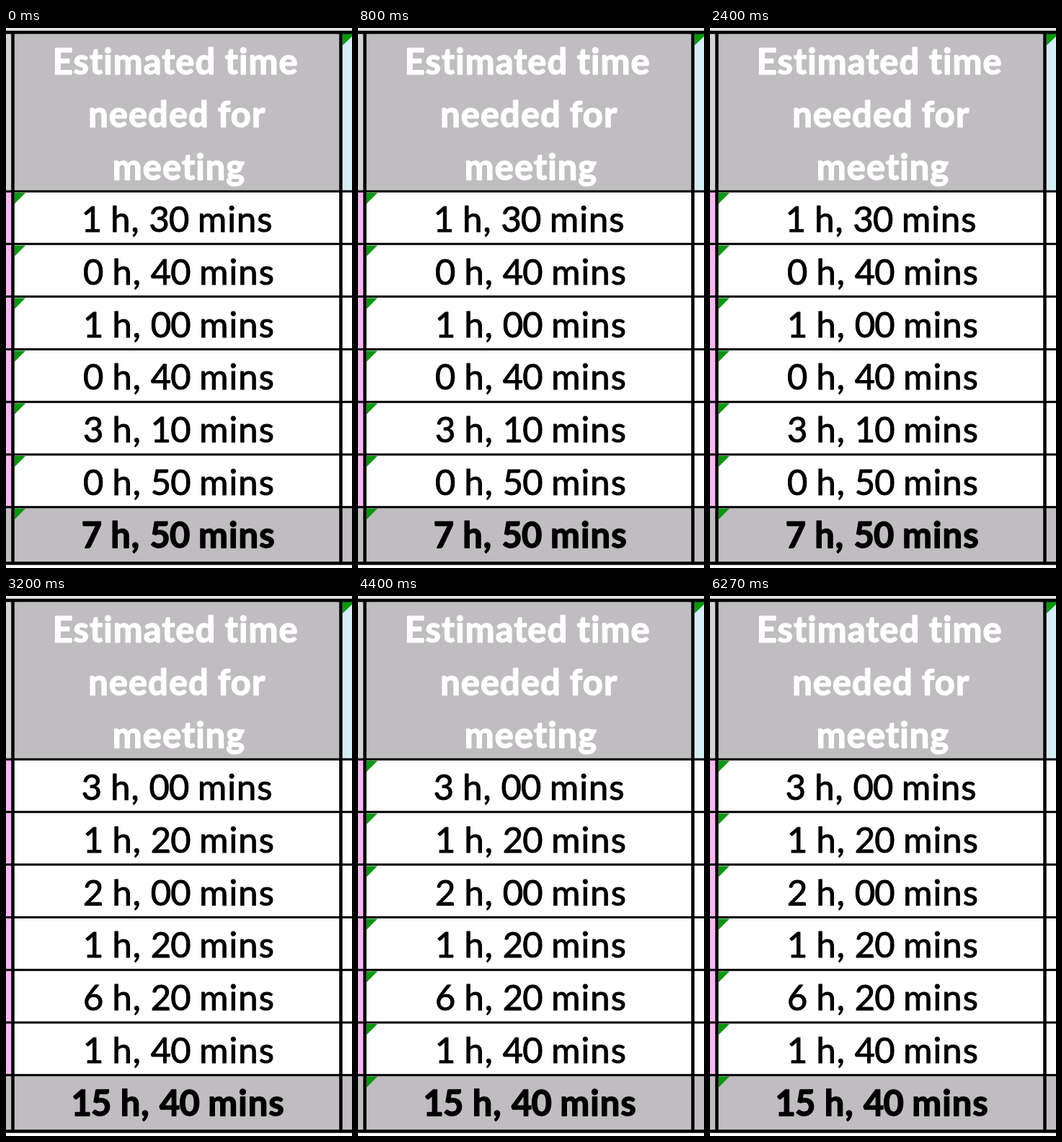
Animation, 480 px wide and 747 px high, one loop 6390 ms. Source, as an HTML page:

```html
<!DOCTYPE html>
<html lang="en">
<head>
<meta charset="utf-8">
<title>Estimated time needed for meeting</title>
<style>
  html, body { margin: 0; width: 100%; height: 100%; overflow: hidden; background: #fff; }
  svg { display: block; width: 100%; height: 100%; }
  text {
    font: 48.8px Lato, Carlito, sans-serif; text-anchor: middle; letter-spacing: 1.1px;
    fill: #000; stroke: #000; stroke-width: 1px; stroke-linejoin: round;
  }
  .digits { letter-spacing: -.8px; }
  .bold { font-weight: 700; stroke-width: 1.5px; }
  .head { fill: #fff; stroke: #fff; }
  .soft { filter: blur(.6px); }
  .before, .after, .flags { animation: 6390ms step-end infinite; }
  .before { animation-name: before; }
  .after { animation-name: after; }
  .flags { animation-name: flags; }
  /* values switch at 2600 ms; the cell flags come back at 3870 ms */
  @keyframes before { 0% { opacity: 1 } 40.689%, 100% { opacity: 0 } }
  @keyframes after { 0% { opacity: 0 } 40.689%, 100% { opacity: 1 } }
  @keyframes flags { 0% { opacity: 1 } 40.689% { opacity: 0 } 60.563%, 100% { opacity: 1 } }
</style>
</head>
<body>
<svg viewBox="0 0 480 747" preserveAspectRatio="none">
  <rect width="480" height="747" fill="#fff"/>
  <rect width="480" height="5" fill="#e4e4e4"/>
  <rect y="6" width="8" height="220" fill="#d2d2d2"/>
  <rect x="10" y="6" width="454" height="220" fill="#bfbdbf"/>
  <rect x="466" y="6" width="14" height="220" fill="#d5edf7"/>
  <rect y="226" width="8" height="437" fill="#fbb6f3"/>
  <rect y="663" width="480" height="77" fill="#bfbdbf"/>
  <g class="soft">
    <path d="M467 8H484L467 24Z" fill="#0a960f"/>
    <g class="flags" id="flags" fill="#0a960f"></g>
    <g id="lines" stroke="#000" fill="none">
      <path d="M-6 6H486M-6 740.5H486" stroke-width="4.5"/>
      <path d="M9.5 5V742M464.5 5V742" stroke-width="4.5"/>
    </g>
    <g id="title"></g>
    <g class="before" id="before"></g>
    <g class="after" id="after"></g>
  </g>
</svg>
<script>
  const PITCH = 72.8;
  const FIRST_LINE = 226;
  const FIRST_BASELINE = 282;
  const NS = 'http://www.w3.org/2000/svg';

  function add(parent, tag, attrs, content = '') {
    const node = document.createElementNS(NS, tag);
    for (const key in attrs) node.setAttribute(key, attrs[key]);
    node.textContent = content;
    document.getElementById(parent).append(node);
  }

  function word(parent, content, x, y, style = '') {
    const cls = /\d/.test(content) ? style + ' digits' : style;
    add(parent, 'text', { x, y, class: cls }, content);
  }

  function duration(parent, hours, minutes, centers, y, style) {
    [hours, 'h,', minutes, 'mins'].forEach((part, i) => word(parent, part, centers[i], y, style));
  }

  function column(parent, values, totalCenters) {
    values.forEach(([hours, minutes], row) => {
      const isTotal = row === values.length - 1;
      const shift = row ? 2.3 : 0;
      const centers = isTotal ? totalCenters : [118.5, 165.5, 226, 318.3].map(x => x + shift);
      duration(parent, hours, minutes, centers, FIRST_BASELINE + row * PITCH, isTotal ? 'bold' : '');
    });
  }

  for (let row = 0; row < 7; row++) {
    const y = FIRST_LINE + row * PITCH;
    add('lines', 'path', { d: `M-6 ${y}H486`, 'stroke-width': 3 });
    add('flags', 'path', { d: `M12 ${y + 2}h15l-15 15z` });
  }

  [['Estimated', 178, 63.5], ['time', 354.7, 63.5],
   ['needed', 198, 136.5], ['for', 327, 136.5],
   ['meeting', 240, 209.5]].forEach(([content, x, y]) => word('title', content, x, y, 'bold head'));

  column('before',
    [['1', '30'], ['0', '40'], ['1', '00'], ['0', '40'], ['3', '10'], ['0', '50'], ['7', '50']],
    [118.5, 165.8, 226.9, 320.4]);
  column('after',
    [['3', '00'], ['1', '20'], ['2', '00'], ['1', '20'], ['6', '20'], ['1', '40'], ['15', '40']],
    [118, 179.3, 240.4, 333.6]);
</script>
</body>
</html>
```
